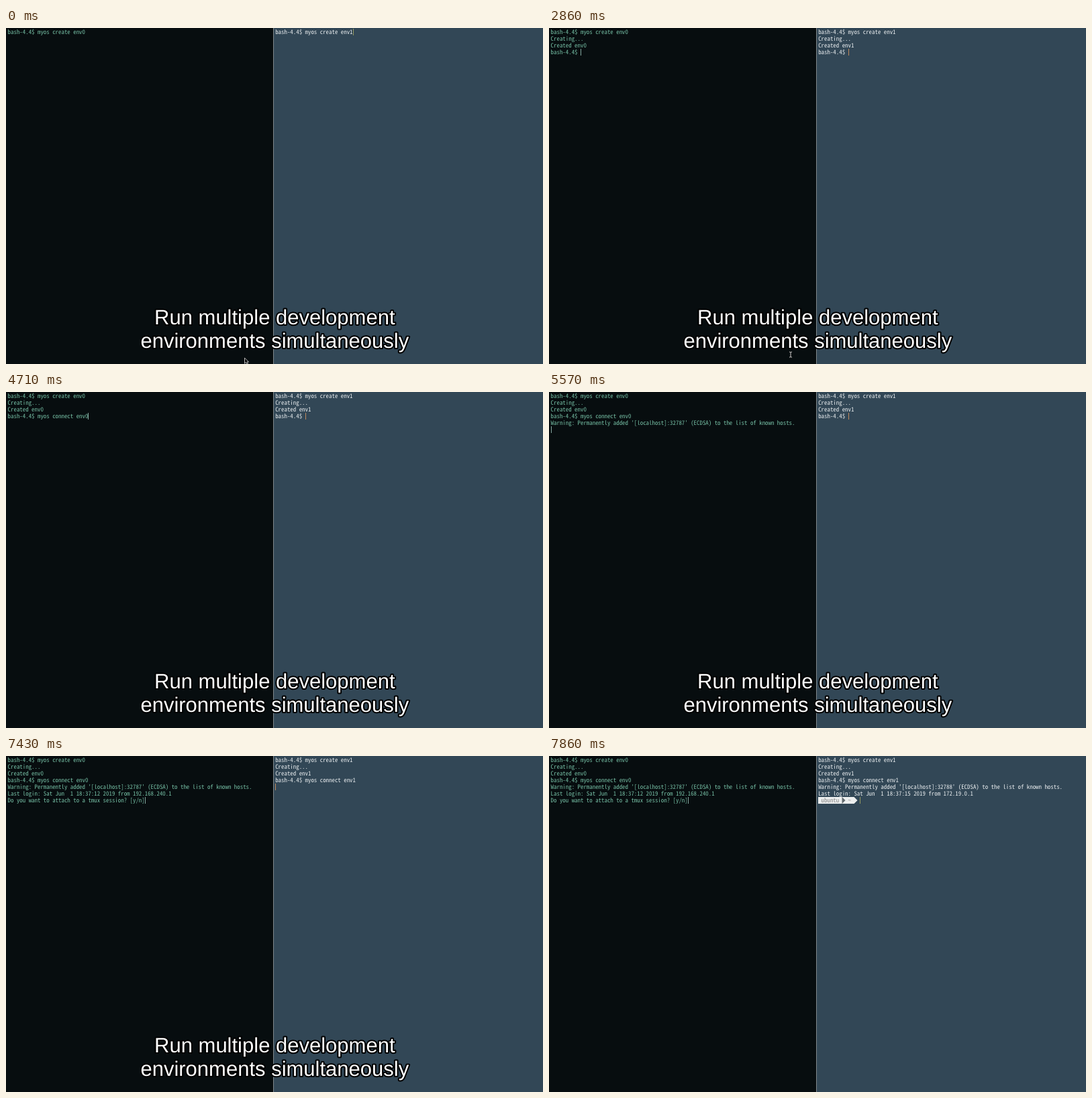
Recreate the animation shown at these times as an HTML page. Size 800x500 px, loop 8 s.

```html
<!DOCTYPE html>
<html lang="en">
<head>
<meta charset="utf-8">
<title>Two terminals</title>
<style>
  html, body { margin: 0; width: 100%; height: 100%; overflow: hidden; background: #070d0f; }
  svg { display: block; width: 800px; height: 500px; }
  text { white-space: pre; text-rendering: geometricPrecision; }
  .term { font-family: "Noto Sans Mono CJK JP", "Noto Sans Mono", monospace; }
  .left { fill: #74bda3; }
  .right { fill: #e8ecee; }
  .caption {
    font: 31px "Liberation Sans", Arial, sans-serif; text-anchor: middle;
    fill: #fff; stroke: #000; stroke-width: 4px; stroke-linejoin: round; paint-order: stroke;
  }
</style>
</head>
<body>
<svg viewBox="0 0 800 500">
  <rect width="398" height="500" fill="#070d0f"/>
  <rect x="398" width="402" height="500" fill="#324756"/>
  <rect x="398" width="1" height="500" fill="#80888b"/>
  <g id="left" class="term left"></g>
  <g id="right" class="term right"></g>
  <g id="prompt" class="term">
    <path d="M401 61h53.5l5 5-5 5H401z" fill="#eceeee"/>
    <path d="M436.5 61l5 5-5 5z" fill="#626a6e"/>
    <text x="405.6" y="69" fill="#858585">ubuntu</text>
    <text x="445.6" y="69" fill="#858585">~</text>
  </g>
  <g id="caption" class="caption">
    <text x="400.3" y="441.3">Run multiple development</text>
    <text x="400.3" y="476.3">environments simultaneously</text>
  </g>
  <path id="arrow" d="M.5 0v8.2l2-1.8 1.5 3 1.4-.7-1.4-2.8h2.6z" fill="#050505" stroke="#e4e4e4" stroke-width=".8"/>
  <g id="beam" fill="none">
    <path d="M-2-4Q0-4 0-3Q0-4 2-4M0-3V3M-2 4Q0 4 0 3Q0 4 2 4" stroke="#111" stroke-width="2.2"/>
    <path d="M-2-4Q0-4 0-3Q0-4 2-4M0-3V3M-2 4Q0 4 0 3Q0 4 2 4" stroke="#ddd" stroke-width=".9"/>
  </g>
</svg>
<script>
const LOOP = 8000, COL = 4.44, ROW = 10, SVG = 'http://www.w3.org/2000/svg';
const $ = id => document.getElementById(id);

// Choose the font size whose monospace advance is one column.
const probe = document.createElement('canvas').getContext('2d');
probe.font = '100px "Noto Sans Mono CJK JP", "Noto Sans Mono", monospace';
const fontSize = COL * 100 / probe.measureText('m').width;
document.querySelectorAll('.term').forEach(g => g.style.fontSize = fontSize + 'px');

const SHELL = 'bash-4.4$ ';
const create = n => `${SHELL}myos create env${n}`;
const creating = n => `${create(n)}\nCreating...\n`;
const created = n => `${creating(n)}Created env${n}\n${SHELL}`;
const connect = n => `${created(n)}myos connect env${n}`;
const warning = n =>
  `${connect(n)}\nWarning: Permanently added '[localhost]:3278${7 + n}' (ECDSA) to the list of known hosts.\n`;
const login = (n, sec, ip) => `${warning(n)}Last login: Sat Jun  1 18:37:${sec} 2019 from ${ip}\n`;
const typing = (n, start, counts) =>
  counts.map((count, i) => [start + i, created(n) + 'myos connect env1'.slice(0, count)]);

// Screen contents, each valid from the given tick (1/7 s).
const leftLogin = login(0, 12, '192.168.240.1');
const leftSteps = [
  [0, create(0)], [3, creating(0)], [13, created(0)],
  ...typing(0, 25, [5, 11, 16]),
  [33, connect(0)], [39, warning(0)], [40, leftLogin],
  [41, leftLogin + 'Do you want to attach to a tmux session? [y/n]']
];
const rightSteps = [
  [0, create(1)], [12, creating(1)], [18, created(1)],
  ...typing(1, 47, [2, 5, 9, 13, 17]),
  [52, connect(1) + '\n'], [53, warning(1)],
  [54, login(1, 15, '172.19.0.1') + ' '.repeat(14)]
];

// Pointer strokes: shape, visible ticks [from, to), then [tick, x, y] stops.
const strokes = [
  ['arrow', 0, 3, [[0, 355, 491], [2, 350, 490]]],
  ['beam', 4, 12, [[4, 372, 491], [8, 490, 477], [9, 489, 476]]],
  ['beam', 19, 29, [[19, 430, 482], [21, 290, 490], [23, 151, 495], [25, 150, 495], [27, 148.5, 494.5]]],
  ['beam', 40, 47, [[40, 190, 493], [43, 500, 470], [45, 675, 441], [46, 674, 441]]]
];

const add = (parent, tag) => parent.appendChild(document.createElementNS(SVG, tag));

function makePane(id, x, steps, caretColor) {
  const group = $(id);
  const rows = Array.from({ length: 7 }, (_, i) => {
    const row = add(group, 'text');
    row.setAttribute('x', x);
    row.setAttribute('y', 9 + i * ROW);
    return row;
  });
  const caret = add(group, 'rect');
  caret.setAttribute('width', 1);
  caret.setAttribute('height', ROW);
  return tick => {
    const lines = steps.filter(s => s[0] <= tick).pop()[1].split('\n');
    rows.forEach((row, i) => row.textContent = lines[i] || '');
    const last = lines.length - 1;
    caret.setAttribute('x', Math.round(x + lines[last].length * COL));
    caret.setAttribute('y', 1 + last * ROW);
    caret.setAttribute('fill', caretColor(tick));
  };
}

const panes = [
  makePane('left', 2.6, leftSteps, tick => tick < 3 ? 'none' : '#84a8a0'),
  makePane('right', 401.2, rightSteps, tick => tick < 12 || tick >= 54 ? '#969a62' : '#c08a5c')
];

function pointAt(stops, tick) {
  const next = stops.findIndex(s => s[0] > tick);
  if (next < 0) return stops[stops.length - 1].slice(1);
  const a = stops[next - 1], b = stops[next], k = (tick - a[0]) / (b[0] - a[0]);
  return [a[1] + (b[1] - a[1]) * k, a[2] + (b[2] - a[2]) * k];
}

const show = (id, on) => $(id).style.display = on ? '' : 'none';

function draw(tick) {
  panes.forEach(pane => pane(tick));
  show('prompt', tick >= 54);
  show('caption', tick < 54);
  show('arrow', false);
  show('beam', false);
  const stroke = strokes.find(s => tick >= s[1] && tick < s[2]);
  if (stroke) {
    show(stroke[0], true);
    $(stroke[0]).setAttribute('transform', `translate(${pointAt(stroke[3], tick)})`);
  }
}

let shown = -1;
function frame() {
  const tick = Math.min(55, Math.floor((performance.now() % LOOP + 5) * 7 / 1000));
  if (tick !== shown) draw(shown = tick);
  requestAnimationFrame(frame);
}
frame();
</script>
</body>
</html>
```
